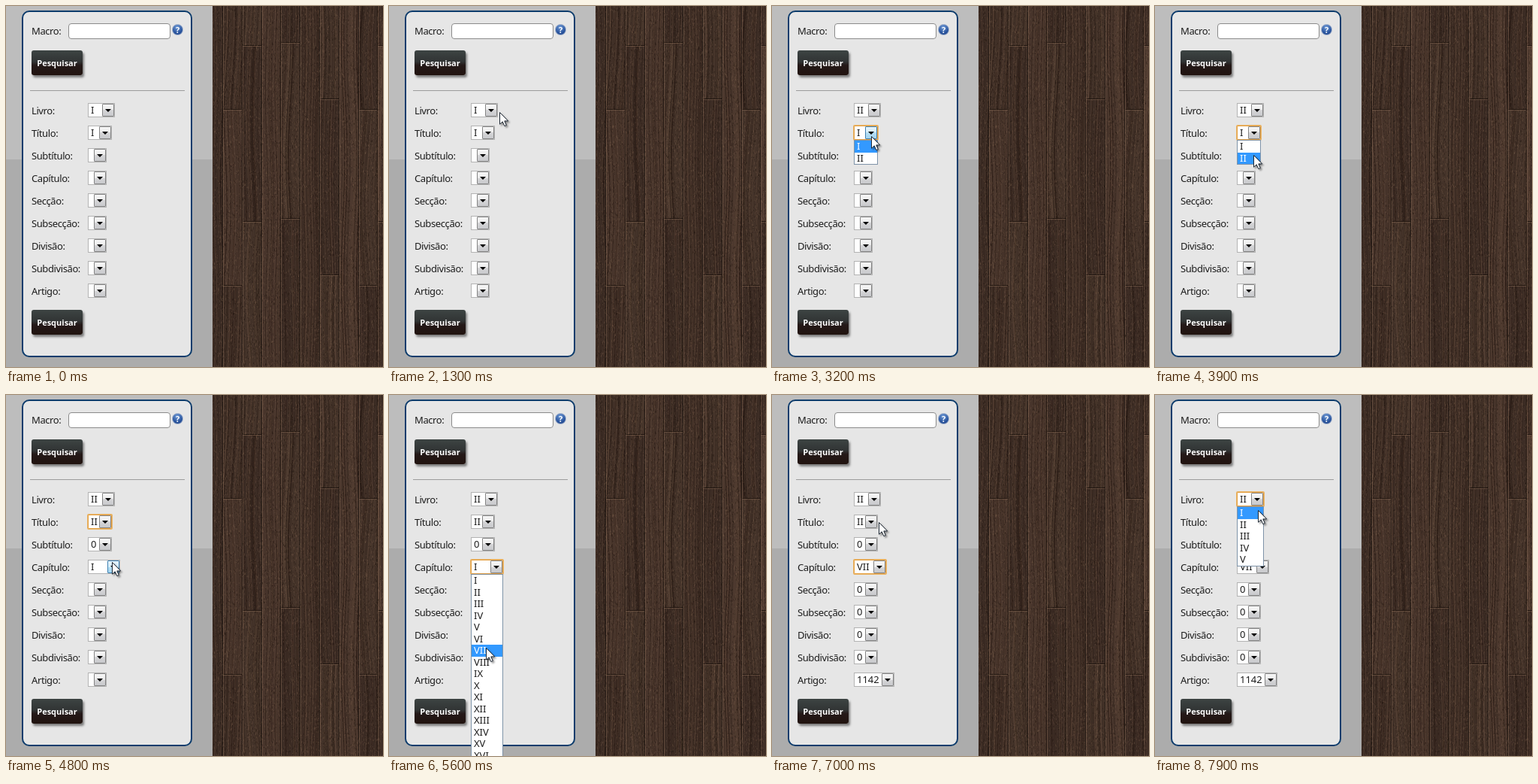
Write an HTML page with a canvas that moves like this. It is 502x480 px and loops after 8 s.

```html
<!DOCTYPE html>
<html lang="pt">
<head>
<meta charset="utf-8">
<title>Pesquisa</title>
<style>
html, body { margin: 0; width: 100%; height: 100%; overflow: hidden; }
body { position: relative; background: linear-gradient(#bdbdbd 204px, #acacac 204px); font: 13px/20px "Noto Sans", "Open Sans", sans-serif; color: #1c1c1c; }
body > * { position: absolute; box-sizing: border-box; white-space: nowrap; }
#wood { left: 275px; top: 0; }
#panel { left: 21px; top: 6px; width: 227px; height: 461px; border: 2px solid #0d3c6c; border-radius: 10px; background: #e6e6e6; }
.label { left: 34px; letter-spacing: -.4px; }
#macro { left: 83px; top: 23px; width: 136px; height: 21px; border: 1px solid #8b8b8b; border-radius: 4px; background: #fff; }
#help { left: 221px; top: 24px; width: 15px; height: 15px; border: 1px solid #9fb0cc; border-radius: 50%; background: radial-gradient(circle at 45% 25%, #6f9ad6, #2a559f 60%, #1c3f82); color: #fff; font: bold 11px/13px "Noto Sans", sans-serif; text-align: center; }
.button { left: 34px; width: 68px; height: 33px; border-radius: 3px; background: linear-gradient(#3d4443, #313434 45%, #241918 60%, #21130f); box-shadow: 2px 3px 3px #7d7d7d; color: #fff; font: bold 11px/34px "Noto Sans", sans-serif; text-align: center; }
#rule { left: 32px; top: 112px; width: 206px; height: 1px; background: #9c9c9c; }
.select { left: 109px; height: 19px; border: 1px solid #b3b3b3; background: #fff; line-height: 17px; padding-left: 3px; }
.select.focus { border-color: #e3a044; box-shadow: 0 0 0 1px #e9b568; border-radius: 1px; }
.select i { position: absolute; right: 0; top: 0; width: 16px; height: 17px; box-sizing: border-box; border: 1px solid #858585; border-radius: 1px; background: linear-gradient(#f7f7f7, #ebebeb 50%, #d6d6d8 50%, #c8c9cc); }
.select i::after { content: ""; position: absolute; left: 3px; top: 6px; border: solid transparent; border-width: 4px 4px 0; border-top-color: #000; }
.select.hover i { border-color: #3f81b2; background: linear-gradient(#e6f4fc, #d5edfb 50%, #b5dff5 50%, #a3d4ef); }
#list { left: 109px; border: 1px solid #7f93a8; background: #fff; }
#list div { height: 15.5px; line-height: 15.5px; padding-left: 3px; }
#list .on { background: #3399ff; color: #fff; }
#cursor { left: 0; top: 0; overflow: visible; filter: drop-shadow(2px 2px 1px rgba(0,0,0,.4)); }
</style>
</head>
<body>
<canvas id="wood" width="227" height="480"></canvas>
<div id="panel"></div>
<div class="label" style="top:23px">Macro:</div>
<div id="macro"></div>
<div id="help">?</div>
<div class="button" style="top:59px">Pesquisar</div>
<div id="rule"></div>
<div class="button" style="top:404px">Pesquisar</div>
<div id="list"></div>
<svg id="cursor" width="13" height="20"><path d="M.5 .5V16.2L4.2 12.8L6.8 18.6L9.3 17.5L6.8 11.9H11.7Z" fill="#fff" stroke="#1d2733"/></svg>
<script>
const $ = id => document.getElementById(id);
const list = $('list'), cursor = $('cursor');
const LOOP = 8000, STEP = 100, ROW = 15.5;
const LABELS = 'Livro Título Subtítulo Capítulo Secção Subsecção Divisão Subdivisão Artigo'.split(' ');
const ROMAN = 'I II III IV V VI VII VIII IX X XI XII XIII XIV XV XVI XVII'.split(' ');
const WIDTHS = { Livro: 36, Capítulo: 43, Artigo: 54 };

const MENUS = [
  { field: 0, opens: 1900, picks: 2700, count: 5 },
  { field: 1, opens: 3200, picks: 4100, count: 2 },
  { field: 3, opens: 4900, picks: 5800, count: 17 },
  { field: 0, opens: 7500, picks: LOOP, count: 5 }
];
// pointer moves: start, end, target x, y
const ENTRY = [62, 105];
const MOVES = [
  [900, 1300, 147, 141], [1300, 1500, 138, 138], [2000, 2300, 134, 165],
  [2600, 3000, 132, 169], [3100, 3900, 131, 198], [4000, 4800, 141, 222],
  [4900, 5600, 129, 336], [5700, 6100, 133, 267], [6100, 6600, 147, 211],
  [6600, 7300, 139, 138], [7600, 7900, 137, 153]
];

const rowTop = k => 129 + 30 * k;

function add(cls, y, html) {
  const el = document.createElement('div');
  el.className = cls;
  el.style.top = y + 'px';
  el.innerHTML = html;
  document.body.insertBefore(el, list);
  return el;
}

const selects = LABELS.map((label, k) => {
  add('label', rowTop(k), label + ':');
  return add('select', rowTop(k), '<span></span><i></i>');
});

function pointAt(t) {
  let [x, y] = ENTRY;
  for (const [from, to, tx, ty] of MOVES) {
    if (t <= from) break;
    const f = Math.min(1, (t - from) / (to - from));
    x += (tx - x) * f;
    y += (ty - y) * f;
  }
  return [Math.round(x), Math.round(y)];
}

function valuesAt(t) {
  const upper = t >= 4300, lower = t >= 6000;
  return [
    t < 2700 ? 'I' : 'II',
    t < 4100 ? 'I' : 'II',
    upper ? '0' : '',
    t >= 5800 ? 'VII' : upper ? 'I' : '',
    ...Array(4).fill(lower ? '0' : ''),
    lower ? '1142' : ''
  ];
}

function drawList(menu, value, y) {
  const box = rowTop(menu.field) + 19;
  const row = Math.floor((y - box - 1) / ROW);
  const on = row < 0 ? ROMAN.indexOf(value) : row;
  list.style.top = box + 'px';
  list.style.width = selects[menu.field].style.width;
  list.innerHTML = ROMAN.slice(0, menu.count)
    .map((s, i) => `<div${i === on ? ' class="on"' : ''}>${s}</div>`).join('');
}

function draw(time) {
  const t = Math.floor(time / STEP) * STEP;
  const [x, y] = pointAt(t);
  const shown = t >= MOVES[0][0];
  const values = valuesAt(t);
  const menu = MENUS.filter(m => t >= m.opens).pop();
  const open = menu && t < menu.picks;

  cursor.style.display = shown ? '' : 'none';
  cursor.style.transform = `translate(${x}px,${y}px)`;

  selects.forEach((el, k) => {
    const width = values[k] ? WIDTHS[LABELS[k]] || 32 : 25;
    const dy = y - rowTop(k);
    const over = shown && x >= 109 && x < 109 + width && dy > 0 && dy < 17;
    const focus = !!menu && menu.field === k;
    el.firstChild.textContent = values[k];
    el.style.width = width + 'px';
    el.classList.toggle('focus', focus);
    el.classList.toggle('hover', over && (!open || focus));
  });

  list.style.display = open ? '' : 'none';
  if (open) drawList(menu, values[menu.field], y);
}

function paintWood() {
  const c = $('wood').getContext('2d');
  const W = 227, H = 480, BOARD = 25.8, LENGTH = 234;
  const joints = [0, 137, 52, 0, 48, 0, 123]; // 0: no joint; the row repeats sideways
  let seed = 11;
  const rnd = () => (seed = seed * 16807 % 2147483647) / 2147483647;
  const bar = (color, x, y, w, h) => {
    c.fillStyle = color;
    c.fillRect(x, y, w, h);
  };
  const DARK = 'rgba(24,15,10,.8)', LIGHT = 'rgba(135,106,86,.5)';

  function board(x, y, h, tone) {
    c.save();
    c.beginPath();
    c.rect(x, y, BOARD, h);
    c.clip();
    bar(`rgb(${52 + tone * 34},${38 + tone * 27},${31 + tone * 22})`, x, y, BOARD + 1, h);
    const phase = rnd() * 6, bend = 1 + rnd() * 3;
    for (let n = 0; n < BOARD; n++) {
      const gx = x + rnd() * BOARD, a = .08 + rnd() * .2;
      c.strokeStyle = n % 3 ? `rgba(25,14,9,${a})` : `rgba(150,115,92,${a * .7})`;
      c.beginPath();
      for (let s = 0; s <= h + 8; s += 8) c.lineTo(gx + bend * Math.sin(s / 50 + phase), y + s);
      c.stroke();
    }
    bar(DARK, x, y, BOARD, 1);
    bar(LIGHT, x, y + 1, BOARD, 1);
    c.restore();
  }

  for (let col = 0; col < 10; col++) {
    const x = Math.round(14 + BOARD * (col - 1));
    const joint = joints[col % 7], h = joint ? LENGTH : H + 4;
    let y = joint ? joint - LENGTH : -4;
    for (let row = 0; y < H; row++, y += h) board(x, y, h, .25 + .13 * ((col + 2 * row) % 4));
    bar(DARK, x - 1, 0, 1, H);
    bar(LIGHT, x, 0, 1, H);
  }
  for (let n = 0; n < 12000; n++) {
    const color = n % 2 ? 'rgba(20,10,6,.22)' : 'rgba(160,125,102,.14)';
    bar(color, Math.floor(rnd() * W), Math.floor(rnd() * H), 1, 1 + Math.floor(rnd() * 3));
  }
}

paintWood();
const start = performance.now();
function tick() {
  draw((performance.now() - start) % LOOP);
  requestAnimationFrame(tick);
}
tick();
</script>
</body>
</html>
```
